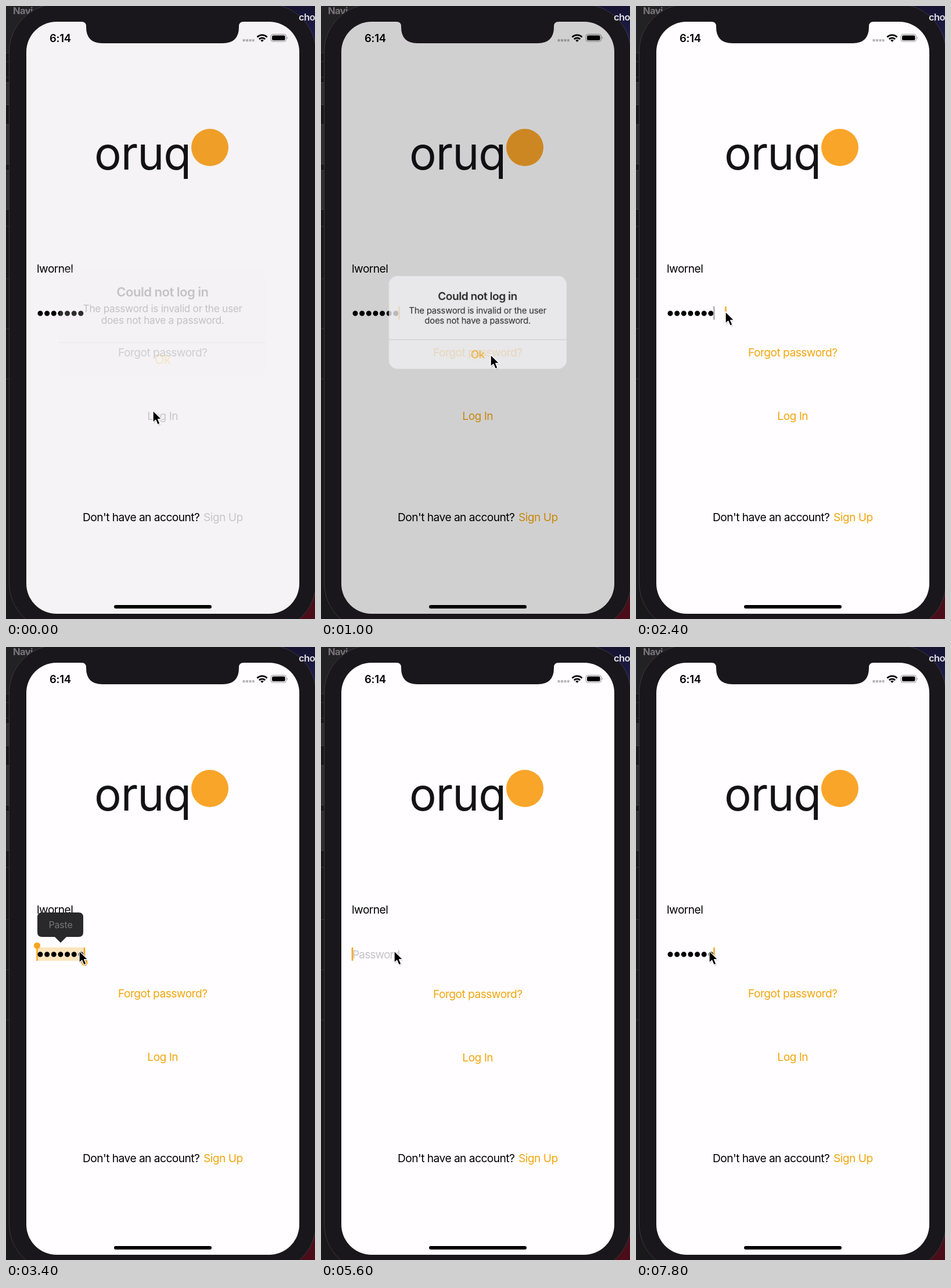
An HTML page for the animation above (8000 ms loop, 532 by 1053 pixels).

```html
<!DOCTYPE html>
<html lang="en">
<head>
<meta charset="utf-8">
<title>Login screen</title>
<style>
  html, body { margin: 0; width: 100%; height: 100%; overflow: hidden; background: #19171b; }
  svg { display: block; width: 532px; height: 1053px; }
  text { font-family: Inter, "Liberation Sans", sans-serif; font-size: 19.2px; letter-spacing: -.55px; }
  .mid { text-anchor: middle; }
  .tint text { fill: currentColor; }

  /* One 8 s loop, held in 200 ms steps (2.5% each) */
  .run { animation: 8s step-end -10ms infinite; }
  .dim { animation-name: dim; }
  .alert { animation-name: alert; transform-origin: 270px 543.5px; }
  .tint { animation-name: tint; }
  .nudge { animation-name: nudge; }
  .typed { animation-name: typed; height: 20px; }
  .hint { animation-name: hint; }
  .caret { animation-name: caret; }
  .ghost { animation-name: ghost; }
  .select { animation-name: select; }
  .menu { animation-name: menu; }
  .pointer { animation-name: pointer; }

  @keyframes dim {
    0% { opacity: .04; }
    2.5% { opacity: .215; }
    12.5% { opacity: .18; }
    15%, 100% { opacity: 0; }
  }
  @keyframes alert {
    0% { opacity: .2; transform: scale(1.15); }
    2.5% { opacity: 1; transform: none; }
    12.5% { opacity: .82; transform: scale(.992); }
    15%, 100% { opacity: 0; transform: scale(.99); }
  }
  @keyframes tint {
    0% { color: #cfced1; }
    12.5%, 100% { color: #f2a60d; }
  }
  @keyframes nudge {
    0% { transform: none; }
    47.5% { transform: translateY(.8px); }
    75%, 100% { transform: none; }
  }
  @keyframes typed {
    0% { width: 90px; }
    52.5% { width: 0; }
    75% { width: 14px; }
    80% { width: 25px; }
    82.5% { width: 37px; }
    85% { width: 49px; }
    90% { width: 60px; }
    92.5% { width: 72px; }
    95%, 100% { width: 90px; }
  }
  @keyframes hint {
    0% { opacity: 0; }
    52.5% { opacity: 1; }
    75%, 100% { opacity: 0; }
  }
  @keyframes caret {
    0% { opacity: 0; transform: translateX(80.5px); }
    12.5% { opacity: 1; transform: translateX(80.5px); }
    20% { opacity: 0; transform: translateX(80.5px); }
    25% { opacity: 1; transform: translateX(80.5px); }
    30% { opacity: 1; transform: translateX(100.5px); }
    32.5% { opacity: 1; transform: translateX(80.5px); }
    37.5% { opacity: 0; transform: none; }
    52.5% { opacity: 1; transform: none; }
    60% { opacity: 0; transform: none; }
    65% { opacity: 1; transform: none; }
    72.5% { opacity: 0; transform: none; }
    75% { opacity: 1; transform: translateX(11.5px); }
    80% { opacity: 1; transform: translateX(23px); }
    82.5% { opacity: 1; transform: translateX(34.5px); }
    85% { opacity: 1; transform: translateX(46px); }
    90% { opacity: 1; transform: translateX(57.5px); }
    92.5% { opacity: 1; transform: translateX(69px); }
    95%, 100% { opacity: 1; transform: translateX(80.5px); }
  }
  @keyframes ghost {
    0% { opacity: 0; }
    30% { opacity: 1; }
    32.5%, 100% { opacity: 0; }
  }
  @keyframes select {
    0% { opacity: 0; }
    37.5% { opacity: 1; }
    52.5%, 100% { opacity: 0; }
  }
  @keyframes menu {
    0% { opacity: 0; }
    40% { opacity: 1; }
    52.5% { opacity: .28; }
    55%, 100% { opacity: 0; }
  }
  @keyframes pointer {
    0% { transform: translate(253px, 695px); }
    5% { transform: translate(253px, 695px); animation-timing-function: steps(2); }
    10% { transform: translate(292px, 599px); }
    17.5% { transform: translate(292px, 599px); animation-timing-function: steps(4); }
    27.5% { transform: translate(154px, 525px); }
    32.5% { transform: translate(140px, 523px); }
    35%, 100% { transform: translate(126px, 522px); }
  }
</style>
</head>
<body>
<svg viewBox="0 0 532 1053">
  <defs>
    <linearGradient id="sky" x2="0" y2="1">
      <stop stop-color="#15132f"/>
      <stop offset="1" stop-color="#25245c"/>
    </linearGradient>
    <clipPath id="screen"><rect x="35" y="27" width="470" height="1017" rx="52"/></clipPath>
    <clipPath id="shown"><rect class="run typed" x="52" y="518"/></clipPath>
  </defs>

  <!-- Desktop behind the phone -->
  <rect width="532" height="1053" fill="#19181b"/>
  <rect width="80" height="80" fill="#222124"/>
  <g fill="#2e2d30" stroke="#434246">
    <rect x="-2" y="131.500" width="20" height="38"/>
    <rect x="-2" y="203.500" width="20" height="68"/>
    <rect x="-2" y="282.500" width="20" height="67"/>
  </g>
  <path d="M0 80.500h9M0 95.500h9M0 122.500h9M0 378.500h9M0 468.500h9M0 554.500h9M0 640.500h9" stroke="#343337"/>
  <text x="12" y="14" fill="#77757a" style="font-size:16.500px;font-weight:700">Navi</text>
  <rect x="450" width="82" height="90" fill="url(#sky)"/>
  <rect x="470" y="1000" width="62" height="53" fill="#4b0d19"/>

  <!-- Phone -->
  <rect x="5.500" y="-3" width="528" height="1076" rx="82" fill="#19171b" stroke="#3b393d"/>
  <text x="504" y="25" fill="#e4e3e8" style="font-size:16.500px;font-weight:600">cho</text>

  <g clip-path="url(#screen)">
    <rect x="35" y="27" width="470" height="1017" fill="#fffdff"/>

    <text x="75" y="61.500" style="font-size:18.500px;font-weight:600;letter-spacing:-.3px">6:14</text>
    <path d="M407.500 59h20" stroke="#b6b4b8" stroke-width="4" stroke-dasharray="4 1.500"/>
    <g fill="none" stroke="#000" stroke-width="2.800">
      <path d="M432.500 53.500a12 12 0 0 1 17 0M435.800 57a7.500 7.500 0 0 1 10.400 0"/>
      <path d="M441 61.800l-2.800-2.800a4 4 0 0 1 5.600 0z" fill="#000" stroke="none"/>
    </g>
    <rect x="456" y="48.500" width="26.500" height="12.500" rx="3.800" fill="none" stroke="#8e8c90"/>
    <rect x="458" y="50.500" width="22.500" height="8.500" rx="2.200"/>
    <path d="M484 52.500q2 2.200 0 4.500z" fill="#8e8c90"/>

    <text x="152" y="281" fill="#131215" style="font-size:78px;letter-spacing:-1px">oruq</text>
    <circle cx="351" cy="243" r="32" fill="#f9a52a"/>

    <text x="53" y="457.500">lwornel</text>

    <g class="run select">
      <rect x="53" y="516" width="82" height="23" fill="#fce5bd"/>
      <path d="M53.500 515v24M135 516v24" stroke="#f7a51c" stroke-width="2.400"/>
      <circle cx="53.500" cy="513" r="5.500" fill="#f7a51c"/>
      <circle cx="135" cy="542" r="5.500" fill="#f7a51c"/>
    </g>
    <path d="M59 528h70.500" clip-path="url(#shown)" stroke="#000" stroke-width="9" stroke-linecap="round" stroke-dasharray="0 11.640"/>
    <text class="run hint" x="54" y="535" fill="#c4c3c6" style="letter-spacing:-.95px">Password</text>
    <rect class="run ghost" x="133.200" y="516" width="2.400" height="23" fill="#aaa8ac"/>
    <rect class="run caret" x="52.700" y="516" width="2.600" height="23" rx="1" fill="#f7a51c"/>

    <g class="run nudge">
      <g class="run tint">
        <text class="mid" x="269.700" y="602">Forgot password?</text>
        <text class="mid" x="269.700" y="711">Log In</text>
        <text x="340" y="884.500">Sign Up</text>
      </g>
      <text x="132" y="884.500">Don't have an account?</text>
    </g>

    <g class="run menu">
      <path d="M62 456h63q8 0 8 8v26q0 8-8 8h-21l-10 10-10-10h-22q-8 0-8-8v-26q0-8 8-8z" fill="#29282a"/>
      <text class="mid" x="94" y="483" fill="#777" style="font-size:16px;letter-spacing:-.2px">Paste</text>
    </g>

    <rect x="186" y="1029" width="168" height="6" rx="3"/>
    <rect class="run dim" x="35" y="27" width="470" height="1017"/>

    <g class="run alert">
      <rect x="115.500" y="463" width="308.500" height="161" rx="15" fill="#f0eff1" fill-opacity=".94"/>
      <text class="mid" x="269.500" y="504.500" style="font-weight:600;letter-spacing:-.45px">Could not log in</text>
      <g class="mid" style="letter-spacing:-.25px">
        <text x="269.700" y="528" style="font-size:15px;letter-spacing:inherit">The password is invalid or the user</text>
        <text x="269.700" y="546" style="font-size:15px;letter-spacing:inherit">does not have a password.</text>
      </g>
      <path d="M115.500 573.500h308.500" stroke="#bfbec1"/>
      <text class="mid" x="269.700" y="606" fill="#f5a90f">Ok</text>
    </g>
  </g>

  <!-- Notch -->
  <path d="M126 26h287v1h-4q-8 0-8 8v1q0 28-28 28h-207q-28 0-28-28v-1q0-8-8-8h-4z" fill="#19171b"/>

  <g class="run pointer">
    <path d="M0 0v20.500l4.700-4.300 3.400 8 4-1.700-3.400-7.700h6.300z" transform="translate(1.200 1.800)" opacity=".18"/>
    <path d="M0 0v20.500l4.700-4.300 3.400 8 4-1.700-3.400-7.700h6.300z" stroke="#fff" stroke-width="1.400" stroke-linejoin="round"/>
  </g>
</svg>
</body>
</html>
```
